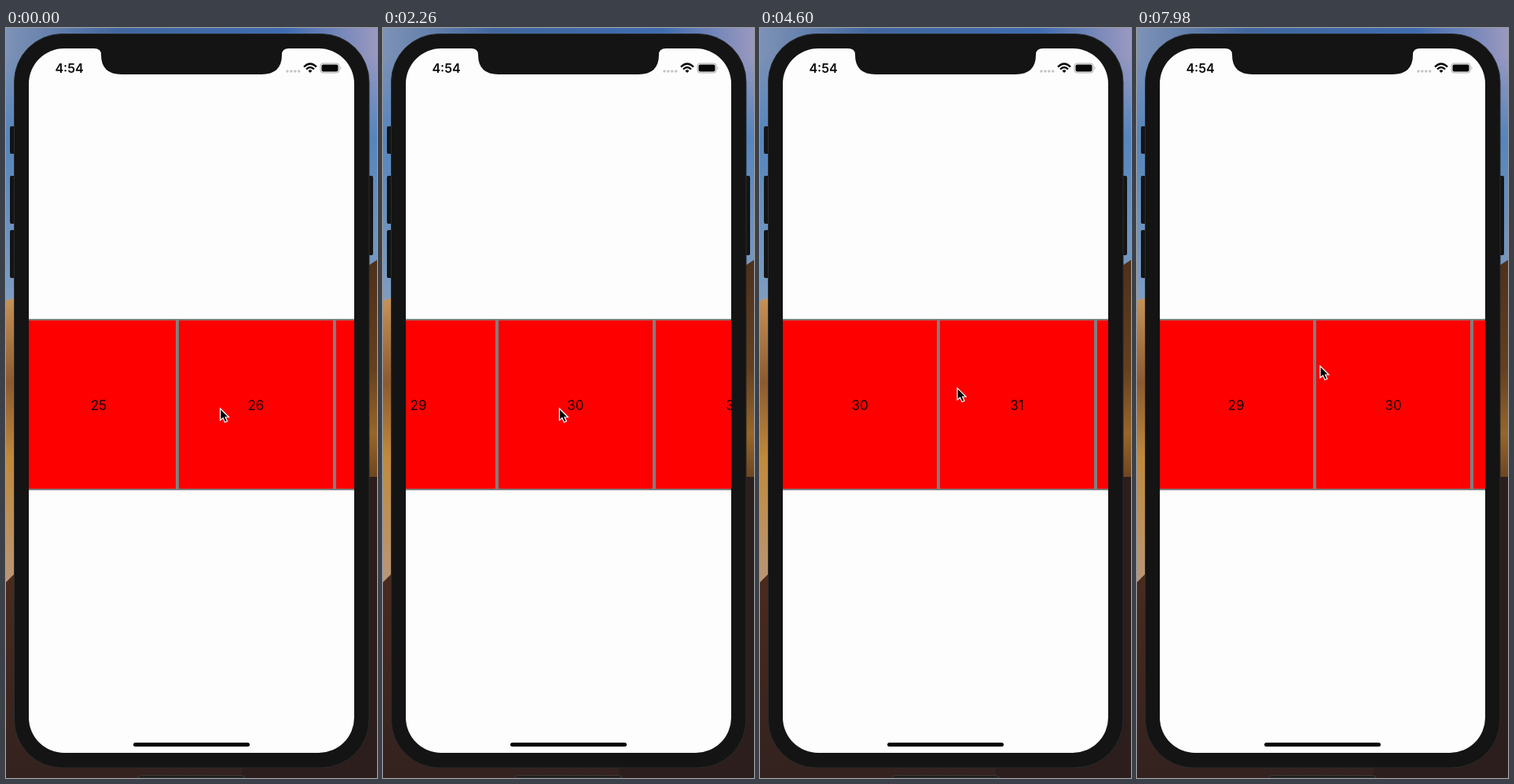
Recreate the animation shown at these times as an HTML page. Size 472x954 px, loop 8 s.

```html
<!DOCTYPE html>
<html lang="en">
<head>
<meta charset="utf-8">
<title>Paging carousel</title>
<style>
  html, body { margin: 0; width: 100%; height: 100%; overflow: hidden; background: #2b1e1c; }
  svg { display: block; width: 472px; height: 954px; }
  text { font-family: Inter, Roboto, sans-serif; text-anchor: middle; }
</style>
</head>
<body>
<svg viewBox="0 0 472 954">
  <defs>
    <linearGradient id="sky">
      <stop stop-color="#7d92b6"/>
      <stop offset=".3" stop-color="#41679f"/>
      <stop offset=".75" stop-color="#3f6cb0"/>
      <stop offset="1" stop-color="#9a99c0"/>
    </linearGradient>
    <linearGradient id="haze" x2="0" y2="1">
      <stop offset=".1" stop-color="#5585bd" stop-opacity="0"/>
      <stop offset=".4" stop-color="#5585bd"/>
      <stop offset="1" stop-color="#7f9dc0"/>
    </linearGradient>
    <linearGradient id="leftDune" x2="0" y2="1">
      <stop stop-color="#c9965c"/>
      <stop offset=".3" stop-color="#8c5a30"/>
      <stop offset=".55" stop-color="#c08a3c"/>
      <stop offset="1" stop-color="#b8977c"/>
    </linearGradient>
    <linearGradient id="rightDune" x2="0" y2="1">
      <stop stop-color="#4e301c"/>
      <stop offset=".5" stop-color="#64401f"/>
      <stop offset=".8" stop-color="#98662a"/>
      <stop offset="1" stop-color="#6f4620"/>
    </linearGradient>
    <linearGradient id="ground" x2="0" y2="1">
      <stop stop-color="#4c2b1e"/>
      <stop offset="1" stop-color="#33221f"/>
    </linearGradient>
    <clipPath id="screen"><rect x="29" y="26" width="414" height="896" rx="45"/></clipPath>
  </defs>

  <rect width="472" height="350" fill="url(#sky)"/>
  <rect width="472" height="350" fill="url(#haze)"/>
  <path d="M0 347L30 336V720H0Z" fill="url(#leftDune)"/>
  <path d="M472 295L440 316V571H472Z" fill="url(#rightDune)"/>
  <rect x="236" y="571" width="236" height="383" fill="#2b1e1c"/>
  <path d="M0 705L30 675V890H300V954H0Z" fill="url(#ground)"/>
  <path d="M168 954Q168 951 172 951H300Q304 951 304 954Z" fill="#171615" stroke="#44403e"/>

  <g fill="#131413">
    <rect x="5" y="125" width="9" height="35" rx="2"/>
    <rect x="5" y="188" width="9" height="61" rx="2"/>
    <rect x="5" y="257" width="9" height="61" rx="2"/>
    <rect x="458" y="188" width="9" height="101" rx="2"/>
    <rect x="10.500" y="7.500" width="451.500" height="933.500" rx="61" stroke="#2b2b2b"/>
  </g>

  <g clip-path="url(#screen)">
    <rect x="29" y="26" width="414" height="896" fill="#fdfdfe"/>
    <g id="strip"></g>
  </g>
  <path d="M112 25H360V26Q351 26 351 34Q351 59 325 59H147Q121 59 121 34Q121 26 112 26Z" fill="#131413"/>

  <text x="80.500" y="56.500" font-size="16" font-weight="600" fill="#0a0a0a">4:54</text>
  <path d="M358 55H374" stroke="#c6c6c6" stroke-width="3.600" stroke-linecap="round" stroke-dasharray="0 4.900"/>
  <g fill="none" stroke="#080808" stroke-width="2.400">
    <path d="M379 49.500Q387 41.500 395 49.500M382 52.500Q387 47.700 392 52.500"/>
    <path d="M384.500 54.500Q387 52 389.500 54.500L387 57Z" fill="#080808" stroke="none"/>
  </g>
  <rect x="400" y="45" width="24" height="12" rx="3.500" fill="#fdfdfe" stroke="#a6a6a6"/>
  <rect x="401.500" y="46.500" width="21" height="9" rx="2" fill="#080808"/>
  <path d="M425.500 49Q427.500 51 425.500 53Z" fill="#a6a6a6"/>
  <rect x="162" y="909" width="148" height="5" rx="2.500"/>

  <path id="cursor" d="M0 0V15L3.500 12L6 17.500L9 16.300L6.600 11H11Z" stroke="#fff" stroke-width="1.200"/>
</svg>

<script>
const LOOP = 8000, TICK = 20;
const CELL = 200, FIRST_PAGE = 25;
const GLIDE = 60, DRAG = 120, RETURN = 160;
const strip = document.getElementById("strip");
const cursor = document.getElementById("cursor");

// Each swipe turns one page; x, y is where the pointer takes hold.
const swipe = (start, dir, x, y) => ({ start, dir, x, y });
const swipes = [
  swipe(-13, 1, 275, 484),
  ...Array.from({ length: 5 }, (_, i) => swipe(1138 + 345.7 * i, 1, 289 - 5 * i, 484)),
  swipe(3471, -1, 131, 458),
  swipe(5784, -1, 71, 431),
  swipe(6650, 0, 233, 430)
];

for (let n = 23; n <= 34; n++) {
  const x = n * CELL;
  strip.innerHTML += `
    <rect x="${x - 99}" y="371" width="198" height="216" fill="#fe0000" stroke="#7f7f7f" stroke-width="2"/>
    <text x="${x}" y="485.500" font-size="17" fill="#180000">${n}</text>`;
}

// Quick start followed by a long, critically damped settling.
function glide(elapsed) {
  const x = Math.max(0, elapsed) / GLIDE;
  return 1 - (1 + x) * Math.exp(-x);
}

const mix = (a, b, k) => a + (b - a) * k;

// The pointer follows the current swipe, then returns in time for the next.
function pointerAt(t) {
  const i = swipes.findLastIndex(s => s.start <= t);
  const now = swipes[i], next = swipes[i + 1] || now;
  const x = now.x - now.dir * DRAG * glide(t - now.start);
  const k = next === now ? 0 : Math.max(0, 1 - (next.start - t) / RETURN);
  return [mix(x, next.x, k), mix(now.y, next.y, k)];
}

function draw(t) {
  const page = swipes.reduce((sum, s) => sum + s.dir * glide(t - s.start), FIRST_PAGE);
  // Each page stop advances by one pixel less than a cell.
  strip.setAttribute("transform", `translate(${97 - (CELL - 1) * page} 0)`);
  cursor.setAttribute("transform", `translate(${pointerAt(t)})`);
}

const began = performance.now();
function frame() {
  const elapsed = Math.round((performance.now() - began) / TICK) * TICK;
  draw(elapsed % LOOP);
  requestAnimationFrame(frame);
}
frame();
</script>
</body>
</html>
```
